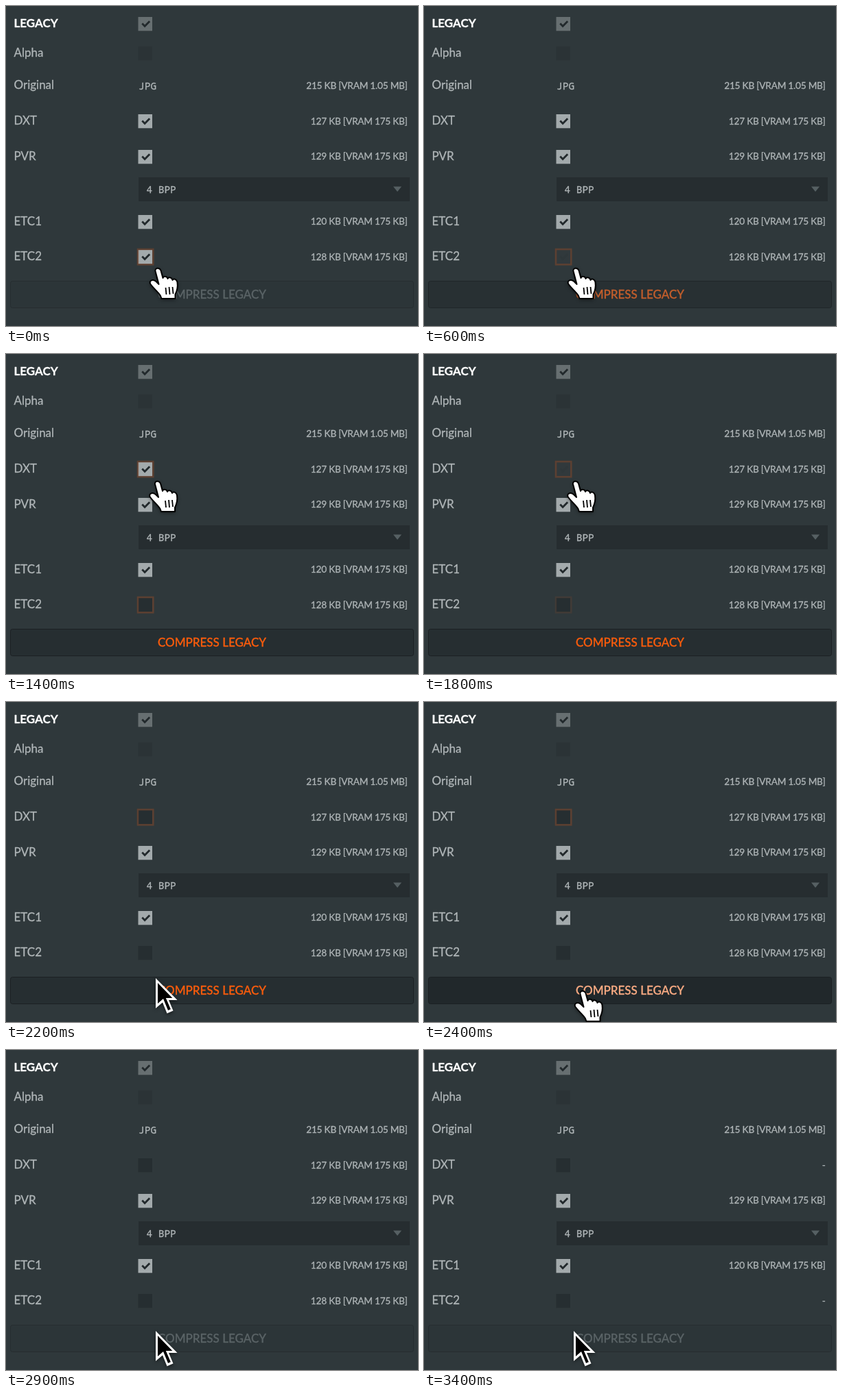
Animation, 600 px wide and 467 px high, one loop 3900 ms. Source, as an HTML page with a canvas:

```html
<!DOCTYPE html>
<html lang="en">
<head>
<meta charset="utf-8">
<title>Texture compression settings</title>
<style>
  html, body { margin: 0; width: 100%; height: 100%; overflow: hidden; background: #2f383b; }
  canvas { display: block; width: 600px; height: 467px; }
</style>
</head>
<body>
<canvas id="stage" width="600" height="467"></canvas>
<script>
const ctx = document.getElementById('stage').getContext('2d');
const LOOP = 3900, TICK = 100;
const SANS = 'Lato, "Open Sans", sans-serif';
const MONO = '"Noto Sans Mono", "DejaVu Sans Mono", monospace';

const BG = [47, 56, 59], DARK = [38, 46, 49], BOX = [163, 170, 172];
const GREY = [90, 99, 102], ORANGE = [250, 92, 12], WHITE = [250, 250, 250];
const INK = '#b0b6b8';

const ramp = (k, a, b) => Math.min(1, Math.max(0, (k - a) / (b - a)));
const mix = (a, b, p) => a.map((v, i) => v + (b[i] - v) * p);
const rgb = (c, alpha = 1) => `rgba(${c.map(Math.round).join(',')},${alpha})`;

// tick, cursor kind, x, y (held until the next entry)
const MOVES = [
  [0, 'hand', 209.5, 382],
  [9, 'arrow', 204, 275],
  [10, 'arrow', 205, 186],
  [11, 'hand', 209, 185],
  [20, 'arrow', 210, 300],
  [21, 'arrow', 216, 385],
  [22, 'arrow', 218, 403],
  [23, 'hand', 219.5, 421],
  [28, 'arrow', 218, 410]
];
const CLICKS = [[3, 203, 370.5], [15, 203.5, 172.5], [25, 213, 409.5]];

// a hair-thin stroke gives the text its slightly heavier weight
function text(str, x, y, font, color = INK, align = 'left') {
  ctx.font = font;
  ctx.fillStyle = ctx.strokeStyle = color;
  ctx.lineWidth = 0.3;
  ctx.lineJoin = 'round';
  ctx.textAlign = align;
  ctx.fillText(str, x, y);
  ctx.strokeText(str, x, y);
}

const label = (str, y) => text(str, 11.5, y, '17px ' + SANS);

function size(str, y) {
  ctx.letterSpacing = '-0.2px';
  text(str, 584.5, y, '13.6px ' + SANS, INK, 'right');
  ctx.letterSpacing = '0px';
}

function checkbox(y, on, focus = 0, dim = 1) {
  ctx.fillStyle = rgb(mix(BG, mix(DARK, BOX, on), dim));
  ctx.fillRect(192.5, y, 20.5, 20.3);
  if (on > 0) {
    ctx.strokeStyle = `rgba(34,41,44,${on})`;
    ctx.lineWidth = 2.8;
    ctx.lineJoin = 'miter';
    ctx.beginPath();
    ctx.moveTo(198.3, y + 9.6);
    ctx.lineTo(202.1, y + 13.5);
    ctx.lineTo(209.2, y + 6.2);
    ctx.stroke();
  }
  if (focus > 0) {
    ctx.strokeStyle = `rgba(140,74,40,${0.48 * focus})`;
    ctx.lineWidth = 2.6;
    ctx.strokeRect(192, y - 1, 22.3, 22.3);
  }
}

function dropdown() {
  ctx.fillStyle = '#262d30';
  ctx.fillRect(193, 250, 395, 35);
  text('4 BPP', 204.5, 273, '14.4px ' + MONO);
  ctx.fillStyle = '#566063';
  ctx.beginPath();
  ctx.moveTo(564, 263.5);
  ctx.lineTo(576, 263.5);
  ctx.lineTo(570, 271);
  ctx.fill();
}

function button(enabled, hover) {
  const fill = mix([44, 53, 56], mix([38, 46, 49], [28, 33, 36], hover), enabled);
  const edge = mix([38, 45, 48], [27, 32, 35], enabled);
  const ink = mix(GREY, mix(ORANGE, WHITE, hover), enabled);
  ctx.beginPath();
  ctx.roundRect(6.5, 401.5, 587, 39, 3);
  ctx.fillStyle = rgb(fill);
  ctx.fill();
  ctx.strokeStyle = rgb(edge);
  ctx.lineWidth = 1;
  ctx.stroke();
  text('COMPRESS LEGACY', 300, 427, '500 17px ' + SANS, rgb(ink), 'center');
}

function shadow(on) {
  ctx.shadowColor = on ? 'rgba(0,0,0,.5)' : 'transparent';
  ctx.shadowBlur = on ? 5 : 0;
  ctx.shadowOffsetY = on ? 2 : 0;
}

function polygon(points, color) {
  ctx.beginPath();
  points.forEach(([x, y]) => ctx.lineTo(x, y));
  ctx.closePath();
  ctx.fillStyle = color;
  ctx.fill();
}

function arrow() {
  shadow(true);
  polygon([[0, 0], [0, 44], [10, 35.5], [16.5, 51.5], [25.5, 47.5], [19, 32], [31.5, 32]], '#fff');
  shadow(false);
  polygon([[3, 7], [3, 37], [11, 30], [18, 47], [21.8, 45.3], [14.8, 29], [24.3, 29]], '#000');
}

const HAND = new Path2D(
  'M8 5C7 0 14-1 16 4L19 15C20 12 25 12 26 16C27 13 32 14 33 18' +
  'C35 15 39 17 40 21C41 28 40 33 37 39L37 45H17L15.5 41' +
  'C12 35 6 31 1 24C-2 19 4 16 9 20L13 24Z');
const CREASES = new Path2D('M23 29L24 39M28 28L29 39M33 28L34 38');

function hand() {
  ctx.lineJoin = 'round';
  ctx.strokeStyle = '#000';
  ctx.lineWidth = 2;
  ctx.fillStyle = '#fff';
  shadow(true);
  ctx.fill(HAND);
  shadow(false);
  ctx.stroke(HAND);
  ctx.lineWidth = 1.8;
  ctx.stroke(CREASES);
}

function cursor(k) {
  const [, kind, x, y] = MOVES.filter(m => m[0] <= k).pop();
  ctx.save();
  ctx.translate(x, y);
  (kind === 'hand' ? hand : arrow)();
  ctx.restore();
}

function ring(k) {
  for (const [start, x, y] of CLICKS) {
    const step = k - start;
    if (step < 0 || step > 2) continue;
    ctx.beginPath();
    ctx.arc(x, y, 27.8 + 30 * step, 0, Math.PI * 2);
    ctx.strokeStyle = '#f0f2f2';
    ctx.lineWidth = 4.6;
    ctx.stroke();
    ctx.strokeStyle = '#000';
    ctx.lineWidth = 2.4;
    ctx.stroke();
  }
}

function draw(k) {
  ctx.fillStyle = rgb(BG);
  ctx.fillRect(0, 0, 600, 467);

  text('LEGACY', 11.5, 30.5, 'bold 17px ' + SANS, '#fff');
  label('Alpha', 73.5);
  label('Original', 121);
  label('DXT', 172.5);
  label('PVR', 224.5);
  label('ETC1', 319.5);
  label('ETC2', 371);
  text('JPG', 193, 122, '14.6px ' + MONO);

  size('215 KB [VRAM 1.05 MB]', 121);
  size(k < 33 ? '127 KB [VRAM 175 KB]' : '-', 173);
  size('129 KB [VRAM 175 KB]', 224);
  size('120 KB [VRAM 175 KB]', 319);
  size(k < 34 ? '128 KB [VRAM 175 KB]' : '-', 371);

  checkbox(16, 1, 0, 0.48);
  checkbox(59, 0, 0, 0.5);
  checkbox(158, 1 - ramp(k, 16, 18.2), k < 27 ? ramp(k, 10, 13) : 0);
  checkbox(210, 1);
  checkbox(305, 1);
  checkbox(356, 1 - ramp(k, 4, 6.2), 1 - ramp(k, 15, 20));

  dropdown();
  const enabled = ramp(k, 3.4, 7.4) * (1 - ramp(k, 27, 29));
  button(enabled, ramp(k, 22, 26));
  ring(k);
  cursor(k);
}

const begin = performance.now();
function frame() {
  const t = (performance.now() - begin) % LOOP;
  draw(Math.floor(t / TICK));
  requestAnimationFrame(frame);
}
frame();
</script>
</body>
</html>
```
